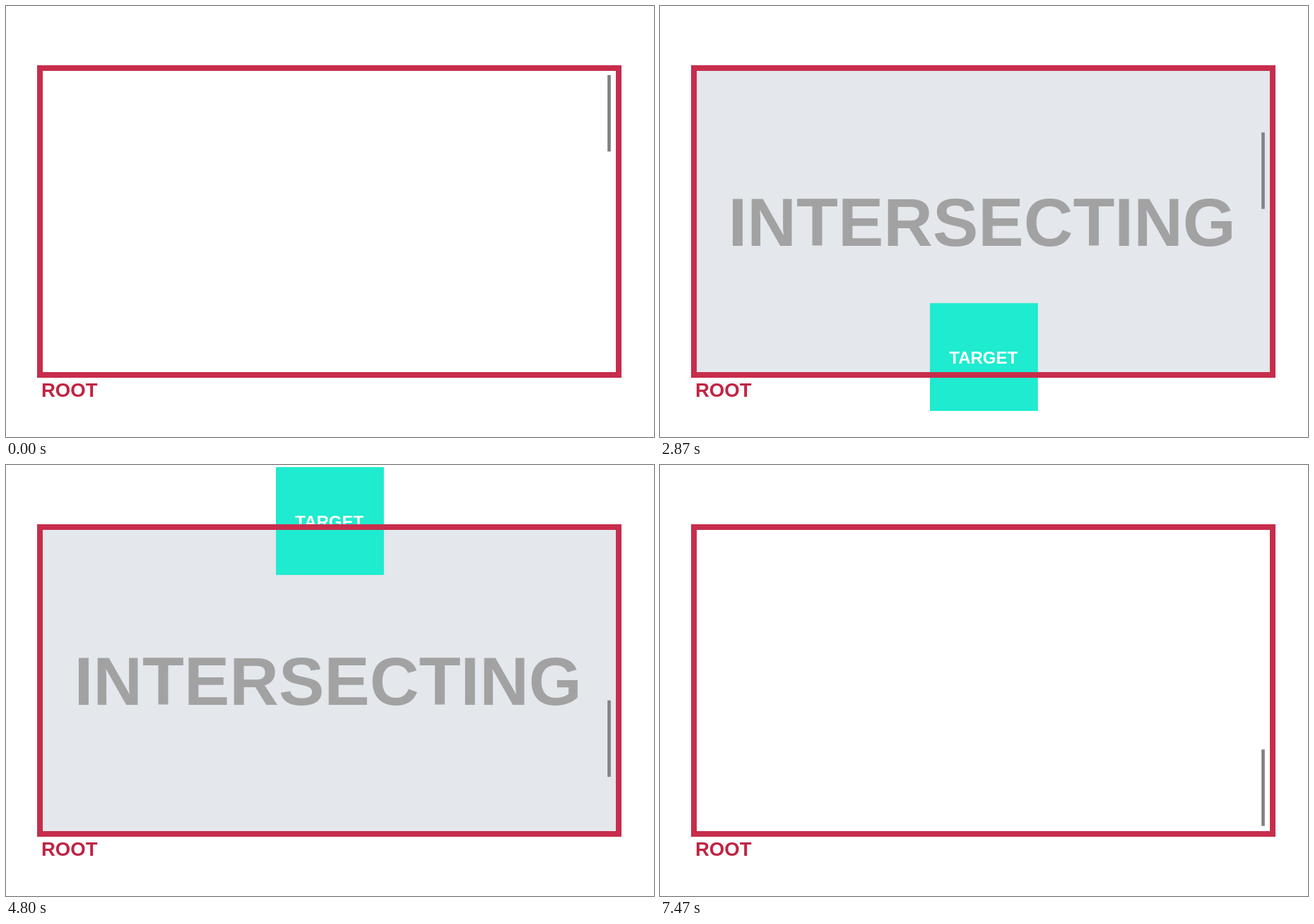
An HTML page that plays this animation: 917 by 611 pixels, repeating every 7530 ms.

```html
<!DOCTYPE html>
<html lang="en">
<head>
<meta charset="utf-8">
<title>Root and target intersection</title>
<style>
  html, body { margin: 0; width: 100%; height: 100%; overflow: hidden; background: #fff; }
  svg { display: block; width: 917px; height: 611px; }
  text { font-family: "Liberation Sans", Arial, sans-serif; font-weight: bold; }
</style>
</head>
<body>
<svg viewBox="0 0 917 611">
  <rect id="thumb" x="851.2" width="4.6" height="108.4" fill="#808080"/>
  <g id="notice" opacity="0">
    <rect x="52" y="92" width="811" height="427" fill="#789" opacity=".2"/>
    <text x="96.5" y="340" font-size="96.5" fill="#a2a2a2">INTERSECTING</text>
  </g>
  <g id="target">
    <rect x="382" width="152.8" height="152.8" fill="#1eebcf"/>
    <text x="457.7" y="86" font-size="24" fill="#fff" text-anchor="middle">TARGET</text>
  </g>
  <rect x="48" y="88" width="819" height="435" fill="none" stroke="#c72d4c" stroke-width="8"/>
  <text x="50" y="554" font-size="27.5" fill="#c02443">ROOT</text>
</svg>
<script>
const LOOP = 7530;
const FPS = 15;
const TARGET_RATIO = 2.708; // target travel per pixel of scrollbar travel

// Scroll moves in frames at 15 fps; distance is scrollbar travel in pixels.
const MOVES = [
  { start: 0, length: 15, distance: 45.6 },
  { start: 26, length: 60, distance: 214.2 },
  { start: 97, length: 15, distance: 45.6 },
];

const [thumb, notice, target] = ['thumb', 'notice', 'target'].map(id => document.getElementById(id));
const clamp = v => Math.min(1, Math.max(0, v));

// cubic-bezier(.42, 0, .58, 1), solved by bisection
function easeInOut(x) {
  if (x <= 0 || x >= 1) return clamp(x);
  let low = 0, high = 1, s;
  for (let i = 0; i < 24; i++) {
    s = (low + high) / 2;
    if (1.26 * s - 0.78 * s * s + 0.52 * s ** 3 < x) low = s;
    else high = s;
  }
  return s * s * (3 - 2 * s);
}

function draw(time) {
  const frame = Math.floor((time % LOOP + 3.4) * FPS / 1000);
  const scroll = MOVES.reduce(
    (sum, m) => sum + m.distance * easeInOut((frame - m.start) / m.length), 0);
  const fadeIn = clamp(0.25 + 0.75 * (frame - 15));
  const fadeOut = clamp(0.75 - 0.75 * (frame - 86));

  thumb.setAttribute('y', 97.9 + scroll);
  target.setAttribute('transform', `translate(0 ${641.5 - scroll * TARGET_RATIO})`);
  notice.setAttribute('opacity', Math.min(fadeIn, fadeOut));
}

const begin = performance.now();
function tick() {
  draw(performance.now() - begin);
  requestAnimationFrame(tick);
}
tick();
</script>
</body>
</html>
```
